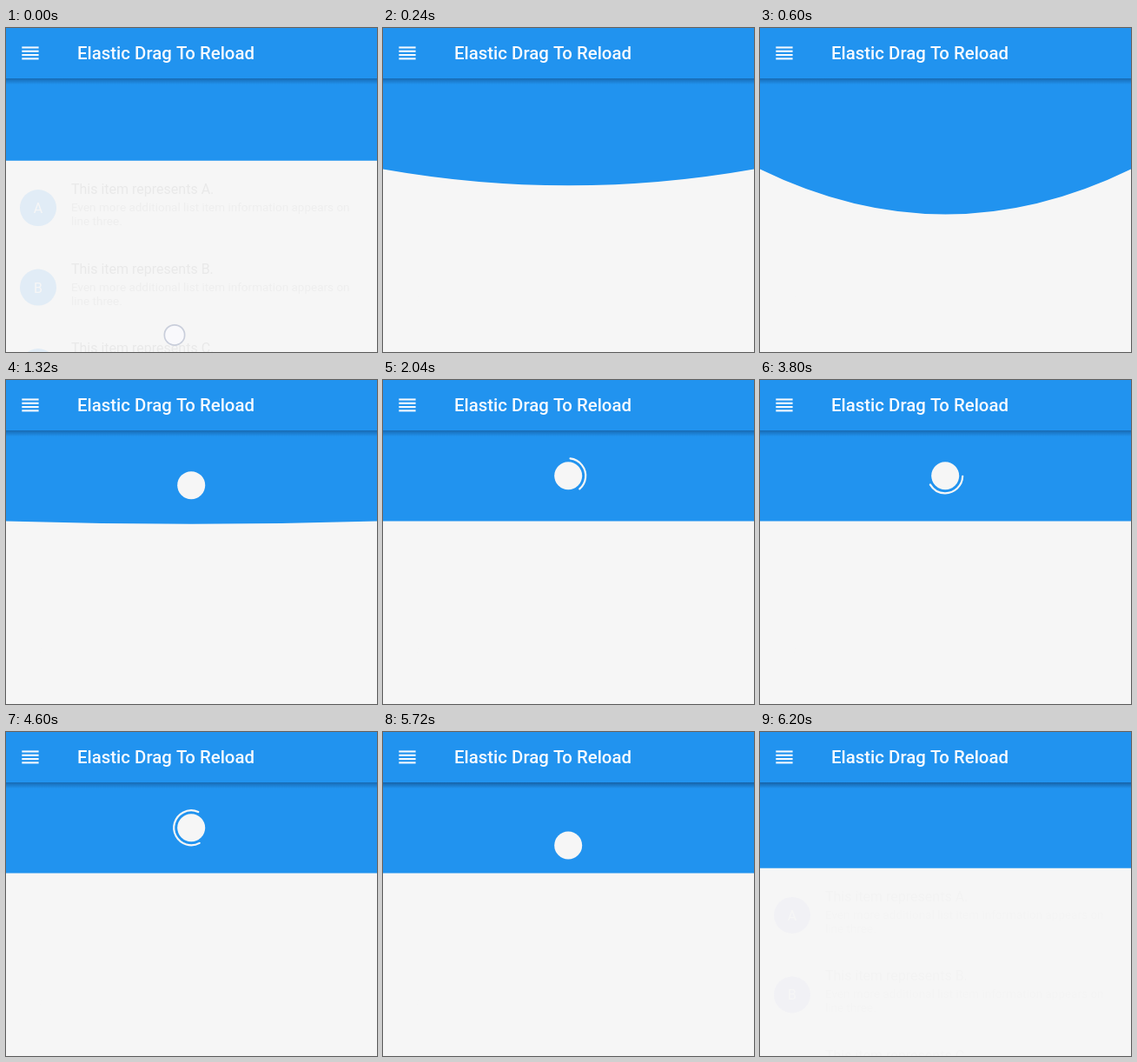
An HTML page with a canvas for the animation above (6240 ms loop, 427x373 px).

```html
<!DOCTYPE html>
<html lang="en">
<head>
<meta charset="utf-8">
<title>Pull to refresh</title>
<style>
  html, body { margin: 0; width: 100%; height: 100%; overflow: hidden; background: #f6f6f6; }
  canvas { display: block; }
</style>
</head>
<body>
<canvas id="stage" width="427" height="373"></canvas>
<script>
const ctx = document.getElementById('stage').getContext('2d');
const W = 427, H = 373, LOOP = 6240;
const BLUE = '#2193ef', PAPER = '#f6f6f6';
const REST = 162.5, PEAK = 52, CX = 213.2, DOT_Y = 110.3;

const progress = (t, from, to) => Math.min(1, Math.max(0, (t - from) / (to - from)));
const mix = (a, b, k) => a + (b - a) * k;

function panelHeight(t) {
  return t < 3000 ? mix(152.8, REST, progress(t, 0, 160)) : mix(REST, 156.7, progress(t, 6010, 6200));
}

// Pulled out by the drag, then released as a damped spring.
function bulge(t) {
  if (t < 680) return PEAK * Math.sin(progress(t, 130, 600) * Math.PI / 2);
  const u = (t - 680) / 1600;
  return u < 1 ? -PEAK * 2 ** (-10 * u) * Math.sin((u - 0.1) * 5 * Math.PI) : 0;
}

function disc(x, y, r, color) {
  ctx.fillStyle = color;
  ctx.beginPath();
  ctx.arc(x, y, r, 0, 2 * Math.PI);
  ctx.fill();
}

function label(text, x, y, size, color, weight = 400) {
  ctx.font = `${weight} ${size}px Roboto, sans-serif`;
  ctx.fillStyle = color;
  ctx.fillText(text, x, y);
}

function drawList(top, t) {
  const closing = t > 3000;
  const alpha = (REST - top) * (closing ? 0.005 : 0.01);
  ['A', 'B', 'C'].forEach((letter, i) => {
    const y = top + 54.2 + i * 91.5;
    ctx.globalAlpha = alpha;
    disc(37, y, 21, closing ? '#5050d8' : BLUE);
    ctx.globalAlpha = 1;
    ctx.textAlign = 'center';
    label(letter, 37, y + 6, 16, PAPER);
    ctx.textAlign = 'left';
    ctx.globalAlpha = alpha * 0.6;
    label(`This item represents ${letter}.`, 75, y - 16, 16, '#222');
    label('Even more additional list item information appears on', 75, y + 4, 13.5, '#777');
    label('line three.', 75, y + 20, 13.5, '#777');
  });
  ctx.globalAlpha = 1;
}

function drawPanel(h, t) {
  ctx.fillStyle = BLUE;
  ctx.beginPath();
  ctx.moveTo(0, 0);
  ctx.lineTo(0, h);
  ctx.quadraticCurveTo(W / 2, h + 2 * bulge(t), W, h);
  ctx.lineTo(W, 0);
  ctx.fill();
}

function drawIndicator(t) {
  if (t < 940 || t > 6020) return;
  const low = 156;
  const y = t < 3000 ? mix(low, DOT_Y, progress(t, 940, 1440)) : mix(DOT_Y, low, progress(t, 5500, 6000));
  disc(CX, y, 16, PAPER);

  const alpha = 1 - progress(t, 5390, 5500);
  if (t < 1440 || alpha === 0) return;
  const turn = (Math.min(t, 5240) - 940) / 1000 % 1;
  const tail = -150 + 660 * turn + 420 * Math.max(0, 2 * turn - 1);
  const sweep = 90 + 210 * (1 - Math.abs(2 * turn - 1));
  ctx.globalAlpha = alpha;
  ctx.strokeStyle = PAPER;
  ctx.lineWidth = 2.2;
  ctx.lineCap = 'round';
  ctx.beginPath();
  ctx.arc(CX, DOT_Y, 20, tail * Math.PI / 180, (tail + sweep) * Math.PI / 180);
  ctx.stroke();
  ctx.globalAlpha = 1;
}

function drawTouch(t) {
  if (t > 250) return;
  const y = mix(353.3, 390, t / 250);
  disc(194, y, 12.5, '#c9cedb');
  disc(194, y, 10.8, '#f9f9fc');
}

function drawHeader(t) {
  const shade = ctx.createLinearGradient(0, 58, 0, 65);
  shade.addColorStop(0, `rgba(10, 50, 95, ${t > 5300 ? 0.5 : 0.42})`);
  shade.addColorStop(1, 'rgba(10, 50, 95, 0)');
  ctx.fillStyle = shade;
  ctx.fillRect(0, 58, W, 7);
  ctx.fillStyle = '#f4f9fe';
  for (let i = 0; i < 4; i++) ctx.fillRect(18.3, 21.4 + i * 4.3, 19.3, 2.1);
  label('Elastic Drag To Reload', 82, 36, 20.4, '#f8fbff', 500);
}

function frame(now) {
  const t = now % LOOP;
  const h = panelHeight(t);
  ctx.fillStyle = PAPER;
  ctx.fillRect(0, 0, W, H);
  drawList(h, t);
  drawPanel(h, t);
  drawIndicator(t);
  drawTouch(t);
  drawHeader(t);
  requestAnimationFrame(frame);
}
requestAnimationFrame(frame);
</script>
</body>
</html>
```
